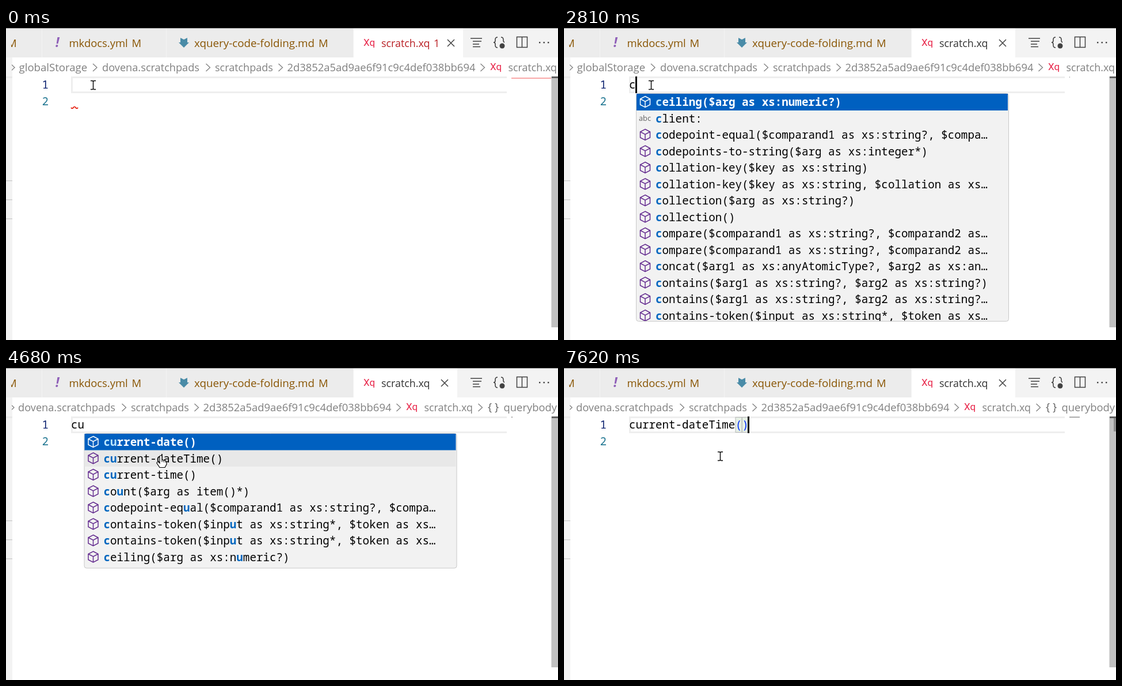
These frames come from a looping animation (959x541 px, 8 s). An HTML page with a canvas:

```html
<!DOCTYPE html>
<html lang="en">
<head>
<meta charset="utf-8">
<title>Code completion</title>
<style>
  html, body { margin: 0; width: 100%; height: 100%; overflow: hidden; background: #fff; }
  canvas { display: block; }
</style>
</head>
<body>
<canvas id="stage" width="959" height="541"></canvas>
<script>
const ctx = document.getElementById('stage').getContext('2d');
const LOOP = 8000, CHAR = 11.54, ROW = 28.5;
const UI = '"Open Sans", "Noto Sans", sans-serif';
const MONO = '"Noto Sans Mono", "DejaVu Sans Mono", monospace';
const BROWN = '#895503', GREY = '#808080', DARK = '#424242', RED = '#e8274b';

const FIRST_LIST = [
  'ceiling($arg as xs:numeric?)',
  'client:',
  'codepoint-equal($comparand1 as xs:string?, $compa…',
  'codepoints-to-string($arg as xs:integer*)',
  'collation-key($key as xs:string)',
  'collation-key($key as xs:string, $collation as xs…',
  'collection($arg as xs:string?)',
  'collection()',
  'compare($comparand1 as xs:string?, $comparand2 as…',
  'compare($comparand1 as xs:string?, $comparand2 as…',
  'concat($arg1 as xs:anyAtomicType?, $arg2 as xs:an…',
  'contains($arg1 as xs:string?, $arg2 as xs:string?)',
  'contains($arg1 as xs:string?, $arg2 as xs:string?…',
  'contains-token($input as xs:string*, $token as xs…'
];
const SECOND_LIST = [
  'current-date()',
  'current-dateTime()',
  'current-time()',
  'count($arg as item()*)',
  'codepoint-equal($comparand1 as xs:string?, $compa…',
  'contains-token($input as xs:string*, $token as xs…',
  'contains-token($input as xs:string*, $token as xs…',
  'ceiling($arg as xs:numeric?)'
];

// Start time and value of each state
const TYPED = [[0, ''], [1480, 'c'], [2930, 'cu'], [4800, 'current-dateTime'], [6390, 'current-dateTime()']];
const CARET_COLUMN = [[0, 0], [1480, 1], [2930, 2], [4800, 16], [6390, 17], [6660, 18]];
const CARET_ON = [[0, 0], [140, 1], [680, 0], [1080, 1], [2030, 0], [2540, 1], [3460, 0], [3900, 1],
  [4410, 0], [4800, 1], [5370, 0], [5770, 1], [6270, 0], [6390, 1], [7090, 0], [7620, 1]];
const MOUSE = [[0, ['beam', 151, 99]], [3900, ['beam', 174, 101]], [4020, ['hand', 217, 111]],
  [4170, ['hand', 300, 143]], [4290, ['hand', 362, 174]], [4410, ['hand', 334, 170]],
  [4530, ['hand', 284, 158]], [4680, ['hand', 269, 151]], [4800, ['beam', 271, 153]]];

const at = (track, t) => track.filter(([start]) => start <= t).pop()[1];
const between = (t, from, to) => t >= from && t < to;

function rect(x, y, w, h, color) {
  ctx.fillStyle = color;
  ctx.fillRect(x, y, w, h);
}

function text(str, x, y, color, size = 18.4, family = UI, style = '') {
  ctx.font = `${style} ${size}px ${family}`;
  ctx.fillStyle = color;
  ctx.fillText(str, x, y);
}

function stroke(path, color, width = 1.5) {
  ctx.strokeStyle = color;
  ctx.lineWidth = width;
  ctx.stroke(new Path2D(path));
}

function fill(path, color) {
  ctx.fillStyle = color;
  ctx.fill(new Path2D(path));
}

function placed(x, y, draw) {
  ctx.save();
  ctx.translate(x, y);
  draw();
  ctx.restore();
}

function clipped(x, y, w, h, draw) {
  ctx.save();
  ctx.beginPath();
  ctx.rect(x, y, w, h);
  ctx.clip();
  draw();
  ctx.restore();
}

const code = (str, x, y, color, style) => text(str, x, y, color, 19.2, MONO, style);
const fileIcon = (x, y) => text('Xq', x, y, RED, 17, 'Roboto, sans-serif');

function drawTabs(t) {
  const broken = t < 1630;
  rect(0, 0, 959, 51, '#f3f3f3');
  [[0, 62], [63, 215], [279, 324]].forEach(([x, w]) => rect(x, 0, w, 51, '#ececec'));
  rect(604, 0, broken ? 190 : 180, 51, '#fff');
  rect(0, 0, 959, 1, '#8c8c8c');

  clipped(9, 0, 30, 51, () => text('M', 2, 33, BROWN));
  text('!', 86, 33, '#8f5fb8', 23, UI, 'italic bold');
  text('mkdocs.yml', 109.5, 33, BROWN);
  text('M', 218.5, 33, BROWN);
  fill('M303 17l6 3 6-3v8h3l-9 9-9-9h3z', '#498ba7');
  text('xquery-code-folding.md', 327, 33, BROWN, 18.8);
  text('M', 543, 33, BROWN);

  fileIcon(621, 31);
  text('scratch.xq', 652, 33, broken ? '#b92025' : '#333', 17.9);
  if (broken) text('1', 743, 33, '#b92025');
  placed(broken ? 773 : 762, 26, () => stroke('M-6-6L6 6M6-6L-6 6', DARK));

  stroke('M807 18h20M811 23h15M811 28h11M811 32.5h13', DARK, 1.6);
  stroke('M854 16q-4 0-4 4v2q0 3-3 3 3 0 3 3v2q0 4 4 4M860 16q4 0 4 4v2q0 2 2 3', DARK, 1.6);
  fill('M857.5 31a4.5 4.5 0 1 0 9 0a4.5 4.5 0 1 0-9 0', DARK);
  stroke('M887.5 15.5h18v18h-18zM896.5 15.5v18', DARK);
  [927, 934.5, 942].forEach(x => rect(x - 1, 24, 2.4, 2.4, DARK));

  if (between(t, 1630, 1780) || between(t, 2540, 2810)) rect(359, 47, 75, 4, '#d8d8d8');
}

function drawBreadcrumbs(t) {
  const inBody = t >= 3460;
  const chevron = x => stroke(`M${x} 62l7 6.5-7 6.5`, GREY, 1.3);
  clipped(10, 51, 949, 33, () => {
    chevron(inBody ? 7 : 8);
    placed(inBody ? -146 : 0, 0, () => {
      if (!inBody) {
        text('globalStorage', 22.5, 75, GREY, 18.6);
        chevron(151);
      }
      text('dovena.scratchpads', 167, 75, GREY, 18.2);
      chevron(347.5);
      text('scratchpads', 363, 75, GREY, 18);
      chevron(473.5);
      text('2d3852a5ad9ae6f91c9c4def038bb694', 488.5, 75, GREY);
      chevron(824.5);
      fileIcon(841, 73);
      text('scratch.xq', 872.5, 75, GREY, 17.9);
      if (inBody) {
        chevron(966.5);
        text('{', 983, 74, '#616161', 19);
        text('}', 995, 74, '#616161', 19);
        text('querybody', 1010.5, 75, GREY);
      }
    });
  });
}

function drawEditor(t) {
  const typed = at(TYPED, t);
  rect(0, 51, 11, 490, '#f3f3f3');
  rect(0, 84, 11, 3, '#e9e9e9');
  [264, 297, 330].forEach(y => rect(0, y, 11, 1.5, '#cfcfcf'));

  rect(113, 84, 757, 29, '#eee');
  rect(116, 87, 754, 23, '#fff');
  code('1', 62.5, 105, '#0b216f');
  code('2', 62.5, 134, '#237893');

  if (t >= 6510) {
    ctx.strokeStyle = '#b9b9b9';
    [297.5, 309].forEach(x => {
      rect(x, 85, 12, 27, '#e6f0e6');
      ctx.lineWidth = 1;
      ctx.strokeRect(x + .5, 85.5, 11, 26);
    });
  }
  const [name, brackets = ''] = typed.split(/(?=\()/);
  code(name, 113, 105, '#000');
  code(brackets, 113 + 16 * CHAR, 105, '#0431fa');
  if (at(CARET_ON, t)) rect(Math.round(112.6 + at(CARET_COLUMN, t) * 11.48), 84, 3, 29, '#000');

  if (!typed) {
    stroke('M113 138q2 3 4 0 2-3 4 0 2 3 4 0', '#e51400', 1.6);
    rect(878, 86, 70, 2, '#f9a8a8');
  }
  for (let i = 0; i < typed.length; i++) rect(878 + i, 84.5, .8, 1.5, '#777');

  rect(947, 84, 1, 435, '#ddd');
  rect(948, 84, 11, 435, '#c1c1c1');
  rect(948, 84, 11, 3, '#5f5f5f');
  if (t >= 6510) rect(955, 87, 4, 23, '#8c8c8c');
}

// Indices of the typed letters found in order within a label
function matches(label, typed) {
  let from = -1;
  return [...typed].map(letter => from = label.indexOf(letter, from + 1));
}

function drawSuggestions(labels, typed, x, bottom, hovered) {
  ctx.beginPath();
  ctx.roundRect(x + .5, 113.5, 647, bottom - 113, 4);
  ctx.fillStyle = '#f2f2f2';
  ctx.fill();
  ctx.strokeStyle = '#c8c8c8';
  ctx.lineWidth = 1;
  ctx.stroke();
  rect(x + 1, 114, 645, 29, '#0060c0');
  if (hovered) rect(x + 1, 114 + hovered * ROW, 645, ROW, '#e8e8e8');

  clipped(x, 113, 648, bottom - 113, () => labels.forEach((label, row) => {
    const selected = row === 0, y = 128 + row * ROW;
    if (label.endsWith(':')) text('abc', x + 5, y + 4, '#616161', 12.8);
    else placed(x + 16, y, () =>
      stroke('M0-9.5L8.5-5V5L0 9.5-8.5 5V-5ZM-8.5-5L0-.5 8.5-5M0-.5V9.5', selected ? '#fff' : '#652d90'));
    const hits = matches(label, typed);
    [...label].forEach((char, i) => {
      const hit = hits.includes(i);
      const color = selected ? (hit ? '#bbe7ff' : '#fff') : (hit ? '#0066bf' : '#000');
      code(char, x + 34 + i * CHAR, y + 7, color, selected || hit ? 'bold' : '');
    });
  }));
}

function drawMouse([kind, x, y]) {
  placed(x, y, () => {
    if (kind === 'beam') {
      stroke('M-4-7.5h3.2L.5-6.5 1.8-7.5H5M.5-7V7M-4 7.5h3.2L.5 6.5 1.8 7.5H5', '#000', 1.4);
    } else {
      const hand = 'M-2 2Q0-1 2 2V8L8 9.5Q10 10 10 12.5V16L7 21.5H-2L-7 14Q-7 11-4 12L-2 14Z';
      fill(hand, '#fff');
      stroke(hand, '#000', 1.2);
      stroke('M2 8v4M5 9v3.5M8 10v3', '#000', 1);
    }
  });
}

function draw() {
  const t = performance.now() % LOOP;
  rect(0, 0, 959, 541, '#fff');
  drawTabs(t);
  drawEditor(t);
  drawBreadcrumbs(t);
  if (between(t, 1630, 2930)) {
    drawSuggestions(FIRST_LIST, 'c', 125, 508);
    if (t < 2540) rect(756, 114, 15, 246, `rgba(100, 100, 100, ${t < 2270 ? .4 : .2})`);
  } else if (between(t, 2930, 4800)) {
    drawSuggestions(SECOND_LIST, 'cu', 135.5, 346.5, t >= 4680 ? 1 : 0);
  }
  drawMouse(at(MOUSE, t));
  requestAnimationFrame(draw);
}
draw();
</script>
</body>
</html>
```
